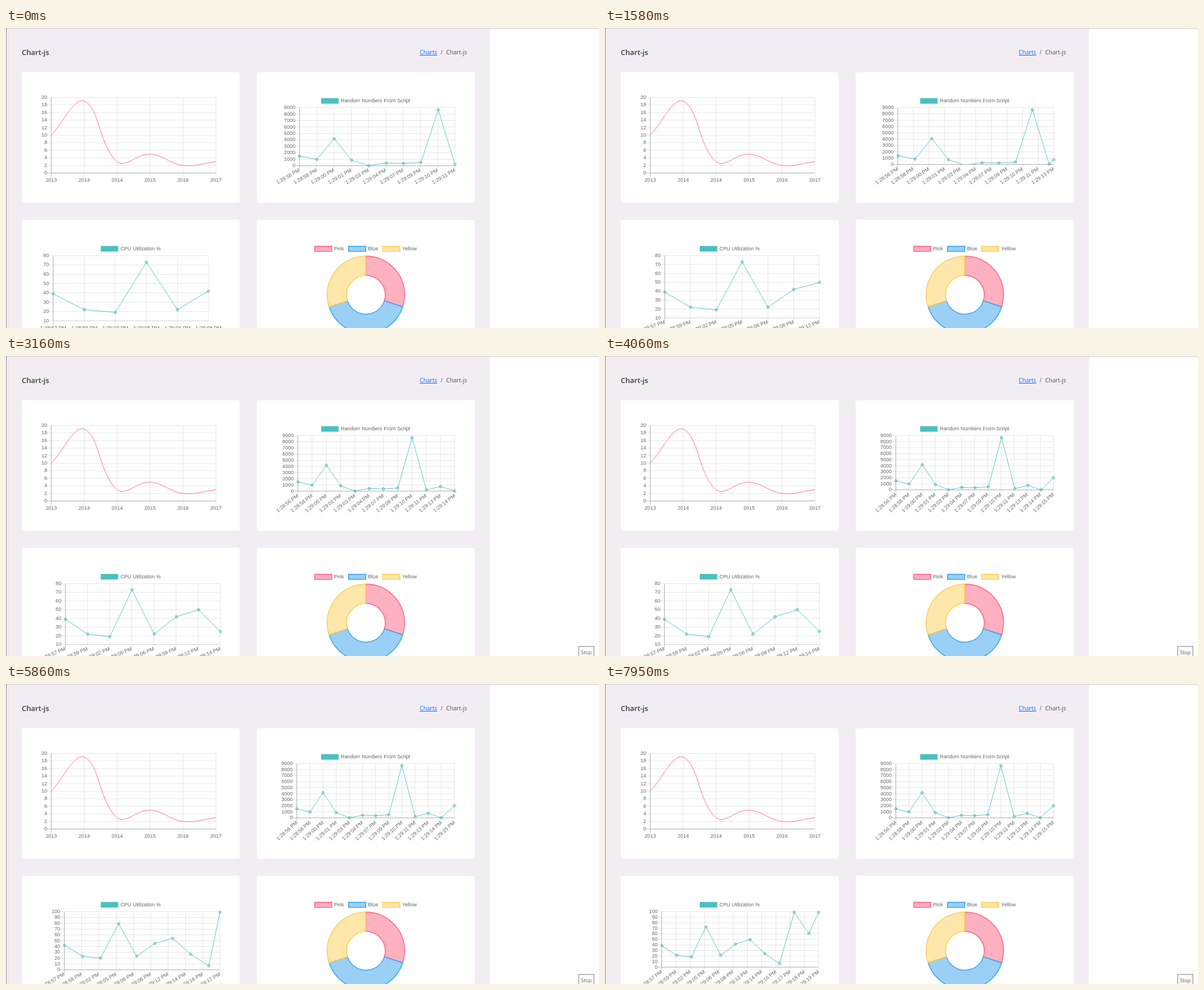
These frames come from a looping animation (1052 px wide and 533 px high, 8000 ms). An HTML page with a canvas:

```html
<!DOCTYPE html>
<html lang="en">
<head>
<meta charset="utf-8">
<title>Chart-js</title>
<style>
  html, body { margin: 0; width: 100%; height: 100%; overflow: hidden; background: #fff; }
  canvas { display: block; }
</style>
</head>
<body>
<canvas id="stage" width="1052" height="533"></canvas>
<script>
const ctx = document.getElementById('stage').getContext('2d');
const LOOP = 8000, EASE_TIME = 1000;
// Live charts add a point on each tick of a slightly slow clock; axes change just before the points move.
const TICK_PERIOD = 1034, TICK_OFFSET = 460, AXIS_LEAD = 45;
const FIRST_TICK = 29 * 60 + 12;

const TICK_LENGTH = 7.6, LABEL_WIDTH = 46.4;
const CHART_FONT = '9.08px "Liberation Sans", Arial, sans-serif';
const UI_FONT = '"Open Sans", "Noto Sans", sans-serif';
const TEAL = 'rgb(75,192,192)', PINK = '255,99,132', BLUE = '54,162,235', YELLOW = '255,206,86';

const history = {
  labels: ['2013', '2014', '2014', '2015', '2016', '2017'],
  values: [10, 19, 3, 5, 2, 3],
  top: 123.3, step: 2
};
const randoms = {
  title: 'Random Numbers From Script', titleX: 559, titleY: 129.3,
  times: '28:56 28:58 29:00 29:01 29:03 29:04 29:07 29:09 29:10 29:11 29:13 29:14 29:15'.split(' '),
  values: [1500, 980, 4200, 870, 20, 430, 370, 510, 8700, 210, 750, 10, 2010],
  canvasLeft: 477.7, canvasRight: 799.2, canvasBottom: 273.2, top: 141.6, step: 1000
};
const cpu = {
  title: 'CPU Utilization %', titleX: 168, titleY: 392,
  times: '28:57 28:59 29:02 29:05 29:06 29:08 29:12 29:14 29:16 29:17 29:18 29:19'.split(' '),
  values: [39, 22, 19, 73, 22, 42, 50, 25, 7, 99, 61, 99],
  canvasLeft: 60.5, canvasRight: 382.4, canvasBottom: 536.2, top: 404.4, step: 10
};

for (const chart of [randoms, cpu]) {
  chart.labels = chart.times.map(time => `1:${time} PM`);
  chart.starts = chart.times.map(time => {
    const [minutes, seconds] = time.split(':').map(Number);
    return TICK_OFFSET + (minutes * 60 + seconds - FIRST_TICK) * TICK_PERIOD;
  });
}

function text(str, x, y, color, font, align = 'left', baseline = 'middle') {
  ctx.fillStyle = color;
  ctx.font = font;
  ctx.textAlign = align;
  ctx.textBaseline = baseline;
  ctx.fillText(str, x, y);
}
const chartText = (str, x, y, align) => text(str, x, y, '#666', CHART_FONT, align);
const uiText = (str, x, y, color, style) => text(str, x, y, color, `${style} ${UI_FONT}`, 'left', 'alphabetic');

function line(x1, y1, x2, y2, alpha) {
  ctx.strokeStyle = `rgba(0,0,0,${alpha})`;
  ctx.lineWidth = 1;
  ctx.beginPath();
  ctx.moveTo(x1, y1);
  ctx.lineTo(x2, y2);
  ctx.stroke();
}

function card(x, y, w, h) {
  ctx.fillStyle = '#fff';
  ctx.beginPath();
  ctx.roundRect(x, y, w, h, 4);
  ctx.fill();
}

function legend(label, x, y, fill, border, width) {
  ctx.fillStyle = fill;
  ctx.strokeStyle = border;
  ctx.lineWidth = width;
  ctx.beginPath();
  ctx.rect(x + 0.5, y - 4.3, 30.3, 9.1);
  ctx.fill();
  ctx.stroke();
  chartText(label, x + 35, y);
}

function valueRange(chart, count) {
  const shown = chart.values.slice(0, count);
  return {
    min: Math.floor(Math.min(...shown) / chart.step) * chart.step,
    max: Math.ceil(Math.max(...shown) / chart.step) * chart.step
  };
}

// Time labels tilt once they no longer fit side by side; the plot gives way to their extent.
function livePlot(chart, count) {
  const spacing = 277 / (count - 1);
  const angle = spacing > 52 ? 0 : Math.asin(15.4 / spacing);
  const sin = Math.sin(angle), cos = Math.cos(angle);
  const padRight = angle ? 5.45 * sin : LABEL_WIDTH / 2;
  const padLeft = angle ? LABEL_WIDTH * cos + padRight : padRight;
  return {
    count, angle, ...valueRange(chart, count),
    left: chart.canvasLeft + padLeft,
    right: chart.canvasRight - padRight,
    bottom: chart.canvasBottom - (angle ? LABEL_WIDTH * sin + 6 * cos : 16)
  };
}

const place = (chart, plot, i) => ({
  x: plot.left + i * (plot.right - plot.left) / (plot.count - 1),
  y: plot.bottom - (chart.values[i] - plot.min) / (plot.max - plot.min) * (plot.bottom - chart.top)
});

function drawAxes(chart, plot) {
  const { left, right, bottom, min, max, angle } = plot;
  for (let value = min; value <= max; value += chart.step) {
    const y = bottom - (value - min) / (max - min) * (bottom - chart.top);
    line(left - TICK_LENGTH, y, right, y, value ? 0.1 : 0.25);
    chartText(value, left - TICK_LENGTH + 0.3, y, 'right');
  }
  for (let i = 0; i < plot.count; i++) {
    const { x } = place(chart, plot, i);
    line(x, chart.top, x, bottom + TICK_LENGTH, i ? 0.1 : 0.25);
    ctx.save();
    ctx.translate(x, bottom + TICK_LENGTH + (angle ? 0 : 5.4));
    ctx.rotate(-angle);
    chartText(chart.labels[i], 0, 0, angle ? 'right' : 'center');
    ctx.restore();
  }
  line(left, chart.top, left, bottom, 0.1);
  line(left, bottom, right, bottom, 0.1);
}

function drawHistory() {
  const plot = { count: 6, angle: 0, min: 0, max: 20, left: 80.3, right: 372.5, bottom: 257.6 };
  drawAxes(history, plot);
  const points = history.values.map((_, i) => place(history, plot, i));
  const clampY = y => Math.min(plot.bottom, Math.max(history.top, y));
  const controls = points.map((p, i) => {
    const a = points[i - 1] || p, b = points[i + 1] || p;
    const before = Math.hypot(p.x - a.x, p.y - a.y), after = Math.hypot(b.x - p.x, b.y - p.y);
    const at = k => ({ x: p.x + k * (b.x - a.x), y: clampY(p.y + k * (b.y - a.y)) });
    return { in: at(-0.4 * before / (before + after)), out: at(0.4 * after / (before + after)) };
  });
  ctx.strokeStyle = `rgb(${PINK})`;
  ctx.lineWidth = 0.9;
  ctx.beginPath();
  ctx.moveTo(points[0].x, points[0].y);
  for (let i = 1; i < points.length; i++) {
    const from = controls[i - 1].out, to = controls[i].in;
    ctx.bezierCurveTo(from.x, from.y, to.x, to.y, points[i].x, points[i].y);
  }
  ctx.stroke();
}

function drawLive(chart, time) {
  const count = chart.starts.filter(start => start - AXIS_LEAD <= time).length;
  const plot = livePlot(chart, count), previous = livePlot(chart, count - 1);
  const t = Math.min(1, Math.max(0, (time - chart.starts[count - 1]) / EASE_TIME));
  const eased = 1 - (1 - t) ** 4;
  const points = [];
  for (let i = 0; i < count; i++) {
    const to = place(chart, plot, i);
    const from = i < count - 1 ? place(chart, previous, i) : to;
    points.push({ x: from.x + (to.x - from.x) * eased, y: from.y + (to.y - from.y) * eased });
  }

  legend(chart.title, chart.titleX, chart.titleY, TEAL, TEAL, 0.76);
  drawAxes(chart, plot);

  const { left, right, bottom } = plot;
  ctx.strokeStyle = TEAL;
  ctx.lineWidth = 0.9;
  ctx.save();
  ctx.beginPath();
  ctx.rect(left - 0.4, chart.top - 0.4, right - left + 0.8, bottom - chart.top + 0.8);
  ctx.clip();
  ctx.beginPath();
  points.forEach(p => ctx.lineTo(p.x, p.y));
  ctx.stroke();
  ctx.restore();

  ctx.fillStyle = 'rgba(0,0,0,0.1)';
  for (const p of points) {
    if (p.x < left - 1 || p.x > right + 1 || p.y > bottom + 1) continue;
    ctx.beginPath();
    ctx.arc(p.x, p.y, 2.3, 0, 2 * Math.PI);
    ctx.fill();
    ctx.stroke();
  }
}

function drawDoughnut() {
  let from = -Math.PI / 2;
  const slices = [['Pink', PINK, 0.3, 547], ['Blue', BLUE, 0.4, 607.3], ['Yellow', YELLOW, 0.3, 667.8]];
  for (const [label, rgb, share, legendX] of slices) {
    const fill = `rgba(${rgb},0.5)`, border = `rgb(${rgb})`;
    legend(label, legendX, 392, fill, border, 1.5);
    const to = from + share * 2 * Math.PI;
    ctx.fillStyle = fill;
    ctx.beginPath();
    ctx.arc(638.45, 474, 68.7, from, to);
    ctx.arc(638.45, 474, 34.4, to, from, true);
    ctx.closePath();
    ctx.fill();
    ctx.stroke();
    from = to;
  }
}

function drawPage() {
  ctx.fillStyle = '#fff';
  ctx.fillRect(0, 0, 1052, 533);
  ctx.fillStyle = '#f2edf3';
  ctx.fillRect(0, 0, 858.5, 533);
  ctx.fillStyle = '#c6c3c7';
  ctx.fillRect(0, 0, 1052, 1);
  ctx.fillStyle = '#858387';
  ctx.fillRect(0, 0, 1, 533);
  for (const x of [28, 445]) {
    card(x, 78.5, 386.5, 231.8);
    card(x, 340.8, 386.5, 231.8);
  }
  uiText('Chart-js', 28, 48, '#343a40', '600 12.9px');
  uiText('Charts', 734, 47, '#0d6efd', '10.2px');
  ctx.fillRect(734, 48, 31, 1);
  uiText('/', 771, 47, '#5c636a', '10.2px');
  uiText('Chart-js', 781, 47, '#495057', '10.2px');
}

function drawPointer(time) {
  if (time >= 540 && time < 1300) {
    ctx.strokeStyle = '#777';
    ctx.lineWidth = 0.8;
    ctx.beginPath();
    ctx.moveTo(1012, 533);
    ctx.lineTo(1016, 530);
    ctx.lineTo(1017, 534);
    ctx.stroke();
  }
  if (time >= 2700) {
    ctx.strokeStyle = '#8a8a8a';
    ctx.lineWidth = 1.2;
    ctx.strokeRect(1016, 516, 27, 20);
    uiText('Stop', 1020, 530, '#575757', '9px');
  }
}

function frame(now) {
  const time = now % LOOP;
  drawPage();
  drawHistory();
  drawLive(randoms, time);
  drawLive(cpu, time);
  drawDoughnut();
  drawPointer(time);
  requestAnimationFrame(frame);
}
requestAnimationFrame(frame);
</script>
</body>
</html>
```
